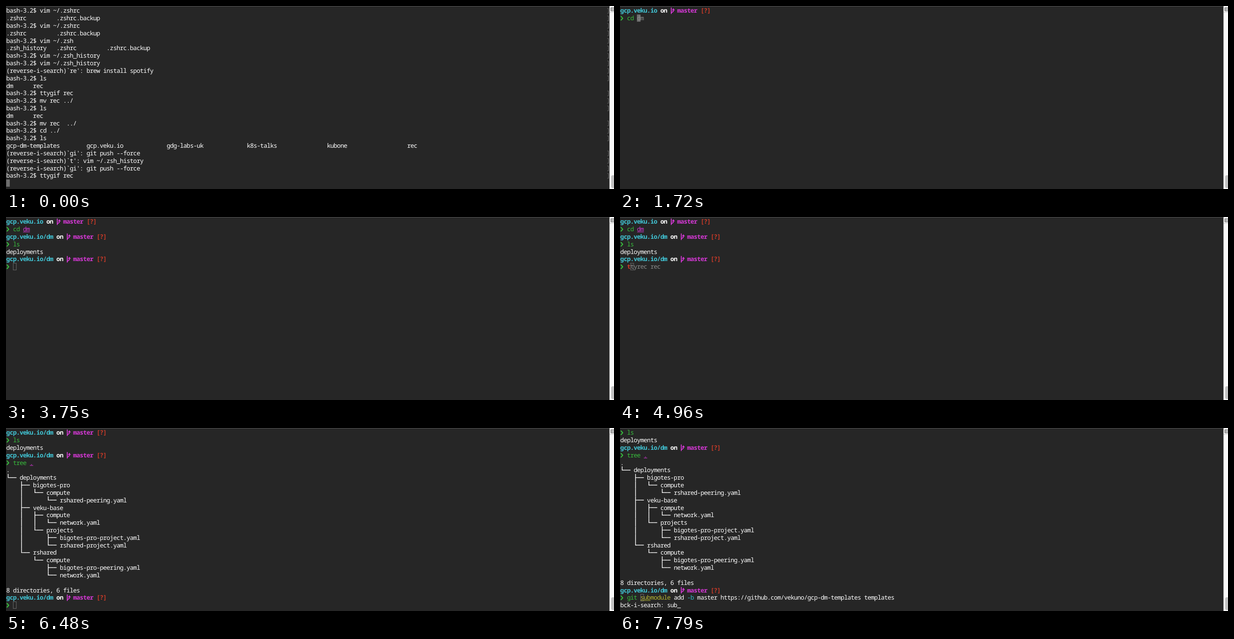
Write an HTML page that moves like this. It is 1280 by 386 pixels and loops after 8 s.

```html
<!DOCTYPE html>
<html lang="en">
<head>
<meta charset="utf-8">
<title>Terminal session</title>
<style>
  html, body { margin: 0; width: 100%; height: 100%; overflow: hidden; background: #262626; }
  svg { display: block; }
  text {
    font: 500 13px "Noto Sans Mono", "DejaVu Sans Mono", monospace;
    letter-spacing: -.767px;
    text-rendering: geometricPrecision;
    white-space: pre;
  }
  .bold { font-weight: 700; }
</style>
</head>
<body>
<svg id="stage" width="1280" height="386" viewBox="0 0 1280 386">
  <rect width="1280" height="386" fill="#262626"/>
  <rect width="1280" height="1" fill="#555"/>
  <g id="screens"></g>
  <g id="scrollbar">
    <rect x="1270" width="10" height="386" fill="#fafafa"/>
    <rect x="1270" width="1" height="386" fill="#8a8a8a"/>
    <rect x="1274" y="357" width="8" height="27" rx="3.5" fill="#c1c1c1"/>
    <path d="M1271 13.5H1280" stroke="#ccc"/>
    <path d="M1281 3.5H1273.5V10.5H1281M1273.5 5.8H1281M1273.5 8.2H1281" fill="none" stroke="#555"/>
  </g>
</svg>
<script>
const LOOP = 8000;
const CW = 7.033, RH = 15.82, LEFT = 1, TOP = 1.8;
const NS = "http://www.w3.org/2000/svg";

// Style codes used in the rows as "^code": colour, bold, underline
const STYLES = {
  w: ["#fff"],
  W: ["#fff", 1],
  C: ["#41c4d4", 1],
  M: ["#d338d3", 1],
  R: ["#c83a28", 1],
  g: ["#38bf3d"],
  G: ["#38bf3d", 1],
  m: ["#d338d3", 0, 1],
  x: ["#8a8c8c"],
  y: ["#b4b431"],
  Y: ["#b4b431", 0, 1],
  c: ["#33bbc8"]
};

const colX = c => LEFT + c * CW;
const rowY = r => TOP + r * RH;

function add(parent, tag, attrs, text) {
  const el = document.createElementNS(NS, tag);
  for (const k in attrs) el.setAttribute(k, attrs[k]);
  if (text) el.textContent = text;
  parent.appendChild(el);
  return el;
}

function stroke(g, d, color, width) {
  add(g, "path", { d, fill: "none", stroke: color, "stroke-width": width });
}

function drawGlyph(g, ch, c, r, color) {
  const x = colX(c), y = rowY(r), mx = x + CW / 2, my = y + RH / 2, end = y + RH;
  const down = `M${mx} ${y}V${end}`, across = `M${mx} ${my}H${x + CW}`;
  const box = {
    "│": down,
    "├": down + across,
    "└": `M${mx} ${y}V${my}H${x + CW}`,
    "─": `M${x} ${my}H${x + CW}`
  };
  if (box[ch]) stroke(g, box[ch], color, 1.4);
  else if (ch === "❯") stroke(g, `M${x + .8} ${y + 3.8}L${x + 4.6} ${y + 8.3}L${x + .8} ${y + 12.8}`, color, 2.1);
  else {
    stroke(g, `M${x + 1.4} ${y + 1.4}V${y + 15}M${x + 1.4} ${y + 12.6}L${x + 5.8} ${y + 9.4}V${y + 6}`, color, 1.8);
    add(g, "path", { d: `M${x + 2.8} ${y + 7.4}L${x + 5.8} ${y + 3}L${x + 9.2} ${y + 7.4}Z`, fill: color });
  }
}

function drawRow(g, row, r) {
  let col = 0;
  for (const part of ("^w" + row).split("^").slice(1)) {
    const [color, bold, under] = STYLES[part[0]];
    const str = part.slice(1);
    for (const m of str.matchAll(/[❯⎇│├└─]|[^\s❯⎇│├└─]+/g)) {
      const c = col + m.index;
      if (/[❯⎇│├└─]/.test(m[0])) drawGlyph(g, m[0], c, r, color);
      else add(g, "text", { x: colX(c) - .4, y: rowY(r) + 12.5, fill: color, class: bold ? "bold" : "" }, m[0]);
    }
    if (under) stroke(g, `M${colX(col)} ${rowY(r) + 14}h${str.length * CW}`, color, 1);
    col += str.length;
  }
}

function drawCursor(g, c, r, solid) {
  const x = colX(c), y = rowY(r);
  if (solid) add(g, "rect", { x: x - .5, y: y + .3, width: CW + .5, height: 15.2, fill: "#6e6e6e" });
  else add(g, "rect", { x: x + .2, y: y + .7, width: CW - .6, height: 14.3, fill: "none", stroke: "#6c6c6c" });
}

const bash = cmd => "bash-3.2$ " + cmd;
const search = (key, hit) => "(reverse-i-search)`" + key + "': " + hit;
const columns = (width, ...names) => names.map(n => n.padEnd(width)).join("");
const prompt = dir => `^C${dir} ^Won ^M⎇ master ^R[?]`;
const zsh = cmd => "^G❯ " + cmd;

const history = [
  bash("vim ~/.zshrc"),
  columns(15, ".zshrc", ".zshrc.backup"),
  bash("vim ~/.zshrc"),
  columns(15, ".zshrc", ".zshrc.backup"),
  bash("vim ~/.zsh"),
  columns(15, ".zsh_history", ".zshrc", ".zshrc.backup"),
  bash("vim ~/.zsh_history"),
  bash("vim ~/.zsh_history"),
  search("re", "brew install spotify"),
  bash("ls"),
  columns(8, "dm", "rec"),
  bash("ttygif rec"),
  bash("mv rec ../"),
  bash("ls"),
  columns(8, "dm", "rec"),
  bash("mv rec  ../"),
  bash("cd ../"),
  bash("ls"),
  columns(24, "gcp-dm-templates", "gcp.veku.io", "gdg-labs-uk", "k8s-talks", "kubone", "rec"),
  search("gi", "git push --force"),
  search("t", "vim ~/.zsh_history"),
  search("gi", "git push --force"),
  bash("ttygif rec")
];
const unmarked = [10, 14, 18];

const home = prompt("gcp.veku.io"), work = prompt("gcp.veku.io/dm");
const log = [
  home,
  zsh("^gcd ^mdm"),
  work,
  zsh("^gls"),
  "deployments",
  work,
  zsh("^gtree ^m."),
  ".",
  "└── deployments",
  "    ├── bigotes-pro",
  "    │   └── compute",
  "    │       └── rshared-peering.yaml",
  "    ├── veku-base",
  "    │   ├── compute",
  "    │   │   └── network.yaml",
  "    │   └── projects",
  "    │       ├── bigotes-pro-project.yaml",
  "    │       └── rshared-project.yaml",
  "    └── rshared",
  "        └── compute",
  "            ├── bigotes-pro-peering.yaml",
  "            └── network.yaml",
  "",
  "8 directories, 6 files",
  work
];

const submodule = (hit, rest) =>
  zsh(`^ggit ^Y${hit}^y${rest}^w add ^c-b^w master https://github.com/vekuno/gcp-dm-templates templates`);

// start, log lines shown, current line, cursor column, options
const steps = [
  [470, 1, zsh(""), 2, { solid: 1 }],
  [1260, 1, zsh("^Rc^xd dm"), 3, { solid: 1 }],
  [1310, 1, zsh("^gcd^x dm"), 4, { solid: 1 }],
  [1720, 1, zsh("^gcd ^xdm"), 5, { solid: 1 }],
  [1830, 1, zsh("^gcd ^md^xm"), 6, { solid: 1 }],
  [2090, 2, "", 0, { solid: 1 }],
  [2570, 2, "", 0],
  [3020, 3, zsh(""), 2],
  [3110, 3, zsh("^Rl^xs"), 3],
  [3330, 3, zsh("^gls"), 4],
  [3350, 5, "", 0],
  [3750, 6, zsh(""), 2],
  [4960, 6, zsh("^Rt^xtyrec rec"), 3],
  [5200, 6, zsh("^Rtr^xee ."), 4],
  [5250, 6, zsh("^Rtre^xe ."), 5],
  [5450, 6, zsh("^gtree^x ."), 6],
  [5560, 6, zsh("^gtree ^x."), 7],
  [5700, 6, zsh("^gtree ^m."), 8],
  [5940, 7, "", 0],
  [5960, 16, "", 0],
  [6060, 24, "", 0, { scroll: 1 }],
  [6480, 25, zsh(""), 2, { scroll: 2 }],
  [7570, 25, zsh(""), 2, { scroll: 3, below: "bck-i-search: _" }],
  [7750, 25, submodule("su", "bmodule"), 6, { scroll: 3, below: "bck-i-search: su_" }],
  [7790, 25, submodule("sub", "module"), 6, { scroll: 3, below: "bck-i-search: sub_" }]
];

const root = document.getElementById("screens");
const screens = [];

function addScreen(start, rows, col, row, solid) {
  const g = add(root, "g", { visibility: "hidden" });
  drawCursor(g, col, row, solid);
  rows.forEach((text, r) => drawRow(g, text, r));
  screens.push({ start, g });
  return g;
}

const first = addScreen(0, history, 0, 23, true);
history.forEach((_, r) => {
  if (!unmarked.includes(r)) stroke(first, `M1266 ${rowY(r) + 3.5}h2.5v10h-2.5`, "#6a6a6a", 1);
});

for (const [start, count, line, col, { solid, scroll = 0, below } = {}] of steps) {
  const rows = [...log.slice(scroll, count), line];
  const row = rows.length - 1;
  if (below) rows.push(below);
  addScreen(start, rows, col, row, solid);
}

let shown = null;
const origin = performance.now();

function tick() {
  const t = (performance.now() - origin) % LOOP;
  const now = screens.filter(s => s.start <= t).pop() || screens[0];
  if (now !== shown) {
    if (shown) shown.g.setAttribute("visibility", "hidden");
    now.g.setAttribute("visibility", "visible");
    shown = now;
  }
  requestAnimationFrame(tick);
}
tick();
</script>
</body>
</html>
```
